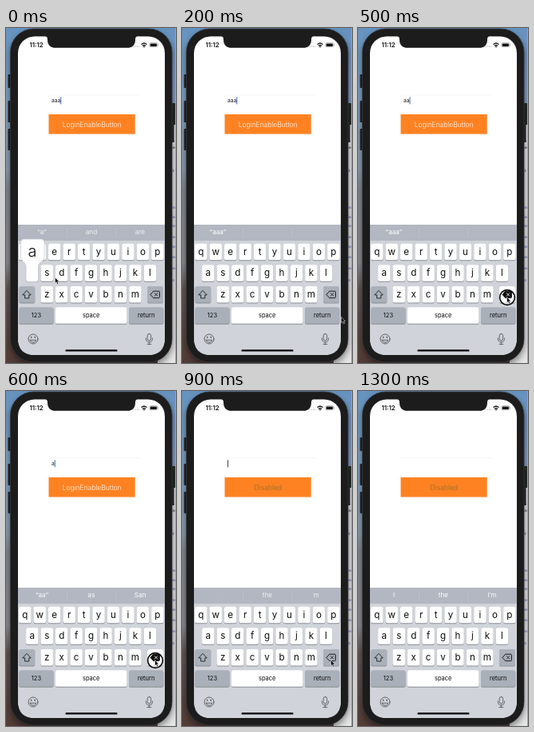
An HTML page for the animation above (1.4 s loop, 213 by 419 pixels).

```html
<!DOCTYPE html>
<html lang="en">
<head>
<meta charset="utf-8">
<title>Login form</title>
<style>
  html, body { margin: 0; width: 100%; height: 100%; overflow: hidden; background: #111; }
  svg { display: block; width: 100vw; height: 100vh; }
  text { font-family: Inter, Roboto, sans-serif; text-anchor: middle; white-space: pre; }
  .start { text-anchor: start; }
  .letter { font-size: 11.6px; fill: #0c0c0e; }
  .small { font-size: 7.5px; fill: #0c0c0e; }
  .hint { font-size: 8.2px; fill: #fff; }
  .code { font: 5px "DejaVu Sans Mono", monospace; text-anchor: start; }
</style>
</head>
<body>
<svg id="stage" viewBox="0 0 213 419" preserveAspectRatio="none" xmlns="http://www.w3.org/2000/svg">
  <defs>
    <linearGradient id="sky" x2="0" y2="1">
      <stop offset="0" stop-color="#6592bf"/>
      <stop offset=".2" stop-color="#809fbe"/>
      <stop offset=".42" stop-color="#8b9cae"/>
      <stop offset=".48" stop-color="#82868f"/>
      <stop offset=".7" stop-color="#8b8a90"/>
      <stop offset=".78" stop-color="#625552"/>
      <stop offset="1" stop-color="#533c37"/>
    </linearGradient>
    <filter id="soft" x="-10%" y="-10%" width="120%" height="120%">
      <feGaussianBlur stdDeviation="4"/>
    </filter>
  </defs>

  <!-- desktop -->
  <rect width="213" height="419" fill="url(#sky)"/>
  <rect x="190" y="120" width="23" height="299" fill="#e4e7e5"/>
  <rect x="206" y="94" width="7" height="27" fill="#1d3320"/>
  <g id="editor"></g>
  <rect x="5" y="6" width="204" height="416" rx="29" opacity=".45" filter="url(#soft)"/>
  <rect x="212" width="1" height="419" fill="#4fdc48"/>

  <!-- phone -->
  <g fill="#1d1e20">
    <rect x="2.5" y="58" width="4" height="17" rx="1"/>
    <rect x="2.5" y="91" width="4" height="27" rx="1"/>
    <rect x="2.5" y="126" width="4" height="27" rx="1"/>
    <rect x="207" y="100" width="3.5" height="43" rx="1"/>
  </g>
  <rect x="5.5" y="1" width="202.5" height="417" rx="29" fill="#1c1c1d" stroke="#363739" stroke-width=".8"/>
  <rect x="15" y="10.4" width="184" height="398.6" rx="21" fill="#fff"/>
  <path d="M47.5 9.5 Q52 10 52 14 Q52 24.8 62 24.8 H152 Q162 24.8 162 14 Q162 10 166.5 9.5Z" fill="#1c1c1d"/>

  <!-- status bar -->
  <text x="38" y="24.3" font-size="7.8" font-weight="600" fill="#111">11:12</text>
  <g fill="#888">
    <circle cx="160" cy="23" r=".6"/><circle cx="162.2" cy="23" r=".6"/>
    <circle cx="164.4" cy="23" r=".6"/><circle cx="166.6" cy="23" r=".6"/>
  </g>
  <g fill="none" stroke="#111" stroke-width="1.2">
    <path d="M169.5 20.6 Q173 17.4 176.5 20.6 M171 22.4 Q173 20.6 175 22.4"/>
    <rect x="179.8" y="18.6" width="10" height="5.2" rx="1.4" stroke="#888" stroke-width=".6"/>
  </g>
  <path d="M171.8 23.2 Q173 22.2 174.2 23.2 L173 24.6Z" fill="#111"/>
  <rect x="180.7" y="19.4" width="8.2" height="3.6" rx=".7" fill="#111"/>
  <rect x="190.3" y="20.2" width=".8" height="2" rx=".4" fill="#888"/>

  <!-- form -->
  <rect x="54" y="83.5" width="114" height=".7" fill="#f1f1f2"/>
  <text id="field" class="start" x="57" y="93.4" font-size="6.7" fill="#17191d"></text>
  <rect id="caret" y="86.3" width="1" height="9"/>
  <rect x="53.5" y="108" width="108.2" height="24.6" fill="#ff8222"/>
  <text id="button" x="107.7" y="123.6" font-size="8.6" letter-spacing="-.08"></text>

  <!-- keyboard -->
  <path d="M15 246 H199 V388 Q199 409 178 409 H36 Q15 409 15 388Z" fill="#d0d3d9"/>
  <rect x="15" y="246" width="184" height="20" fill="#b2b7c1"/>
  <g id="hints"></g>
  <g id="keys"></g>

  <g fill="none" stroke="#53565c" stroke-width=".9" stroke-linecap="round" stroke-linejoin="round">
    <path d="M26.2 328.6 L31.2 333.9 H28.8 V338 H23.6 V333.9 H21.2Z" stroke="#1c1d20"/>
    <circle cx="34" cy="389" r="6"/>
    <path d="M30.2 390.3 H37.8 Q37 393.3 34 393.3 Q31 393.3 30.2 390.3Z"/>
    <path d="M31.8 386.2 V387.4 M36.2 386.2 V387.4" stroke-width="1.3"/>
    <rect x="177.2" y="382.5" width="4.4" height="8.4" rx="2.2"/>
    <path d="M175.2 388 Q175.2 393 179.4 393 Q183.6 393 183.6 388 M179.4 393 V395.6 M177 395.6 H181.8"/>
  </g>
  <rect x="74.5" y="402.2" width="65" height="2.4" rx="1.2" fill="#08080a"/>

  <g stroke-linejoin="round">
    <rect id="eraseKey" x="177" y="323" width="20" height="20.5" rx="2.6"/>
    <circle id="ring" cx="187" cy="337" r="9.4" fill="#fff" fill-opacity=".6" stroke="#0b0b0c" stroke-width="1.6"/>
    <path id="eraseShape" d="M181 333.4 L184.7 329.2 H191.4 Q192.4 329.2 192.4 330.2 V336.6 Q192.4 337.6 191.4 337.6 H184.7Z" stroke="#0b0b0c" stroke-width=".9"/>
    <path id="eraseCross" d="M186 331.4 L190 335.4 M190 331.4 L186 335.4" fill="none" stroke-width=".9"/>
  </g>

  <g id="popup">
    <path d="M22.5 264 H44 Q48 264 48 268 V286 Q48 290 44 292.6 Q40.5 295 40.5 298 V314.5 Q40.5 317.5 37.5 317.5 H28 Q25 317.5 25 314.5 V298 Q25 295 22 292.6 Q18.5 290 18.5 286 V268 Q18.5 264 22.5 264Z" fill="#fff" stroke="#b9bcc3" stroke-width=".6"/>
    <text x="33" y="285.6" font-size="20" font-weight="300" fill="#0c0c0e">a</text>
  </g>

  <path id="mouse" d="M0 0 V7.2 L1.7 5.7 L2.9 8.5 L4.2 7.9 L3 5.2 H5.2Z" fill="#0b0b0c" stroke="#fff" stroke-width=".5"/>
</svg>
<script>
const $ = id => document.getElementById(id);
const NS = 'http://www.w3.org/2000/svg';

function add(parent, tag, attrs, text = '') {
  const node = document.createElementNS(NS, tag);
  for (const k in attrs) node.setAttribute(k, attrs[k]);
  node.textContent = text;
  return parent.appendChild(node);
}
const set = (id, attrs) => {
  for (const k in attrs) $(id).setAttribute(k, attrs[k]);
};
const show = (id, on) => set(id, { opacity: Number(on) });

// Editor text peeking out beside the phone
[['n', 143], ['ac', 151], ['it', 180], ['xe', 226], ['xe', 238],
 ['xe', 249], ['xe', 263], ['xe', 275], ['xe', 288], ['xe', 302], ['o', 317]]
  .forEach(([s, y]) => add($('editor'), 'text',
    { class: 'code', x: 208, y, fill: y < 200 ? '#30343a' : '#3f55a5' }, s));

// Keyboard
const keys = $('keys');
function key(x, y, w, label, cls, fill = '#fff') {
  add(keys, 'rect', { x, y: y + 1, width: w, height: 20.5, rx: 2.6, fill: '#898d94' });
  add(keys, 'rect', { x, y, width: w, height: 20.5, rx: 2.6, fill });
  add(keys, 'text', { class: cls, x: x + w / 2, y: y + (cls === 'letter' ? 13.9 : 12.9) }, label);
}
const GREY = '#aab0ba';
[['qwertyuiop', 23.8, 269.8], ['asdfghjkl', 32.8, 296.3], ['zxcvbnm', 51.2, 323]]
  .forEach(([row, x, y]) => [...row].forEach((c, i) => key(x + i * 18.45 - 7.7, y, 15.4, c, 'letter')));
key(16.2, 323, 20, '', 'small', GREY);
key(177, 323, 20, '', 'small', GREY);
key(16.2, 349.3, 43.4, '123', 'small', GREY);
key(62, 349.3, 89.5, 'space', 'small');
key(154, 349.3, 43.4, 'return', 'small', GREY);

// Suggestion bar
for (const x of [76, 137.5])
  add($('hints'), 'rect', { x, y: 250, width: .6, height: 12, fill: '#c0c4cc' });
const hints = [45, 107, 168].map(x => add($('hints'), 'text', { class: 'hint', x, y: 258.2 }));

// One step per 100 ms
const LISTS = {
  a: ['“a”', 'and', 'are'],
  aa: ['“aa”', 'as', 'San'],
  aaa: ['“aaa”', '', ''],
  fade: ['.', 'the', 'm'],
  empty: ['I', 'the', 'I’m']
};
// typed, suggestions, suggestion opacity, caret opacity, mouse x, mouse y, pressed
const STEPS = [
  ['aaa', 'a', .8, 1, 61.5, 312, 0],
  ['aaa', 'aaa', 1, 1, 140, 344, 0],
  ['aaa', 'aaa', 1, 1, 199.5, 361.5, 0],
  ['aaa', 'aaa', 1, .5, 192, 346, 0],
  ['aaa', 'aaa', 1, 0, 186.5, 335.5, 0],
  ['aa', 'aaa', 1, 1, 186.5, 336.5, 1],
  ['a', 'aa', 1, 1, 186.5, 336.5, 1],
  ['', 'a', 1, 1, 186.5, 336.5, 1],
  ['', 'fade', .4, 1, 186.5, 336.5, 0],
  ['', 'fade', .8, 1, 186.5, 336.5, 0],
  ['', 'empty', 1, 1, 186.5, 337.5, 0],
  ['', 'empty', 1, 1, 186.5, 337.5, 0],
  ['', 'empty', 1, .5, 186.5, 337.5, 0],
  ['', 'empty', 1, 0, null, 0, 0]
];
const STEP_MS = 100;
let last = -1;

function draw(n) {
  const [typed, list, fade, caret, x, y, pressed] = STEPS[n];
  $('field').textContent = typed;
  set('caret', { x: 57 + typed.length * 3.75, opacity: caret, fill: typed ? '#4668a8' : '#3a414d' });
  $('button').textContent = typed ? 'LoginEnableButton' : 'Disabled';
  set('button', { fill: typed ? '#fff4e8' : '#a8702e', 'font-weight': typed ? 300 : 400 });

  hints.forEach((h, i) => {
    h.textContent = LISTS[list][i];
    h.setAttribute('opacity', list === 'fade' && i === 0 ? fade * .4 : fade);
  });

  show('popup', n === 0);
  show('ring', pressed);
  set('eraseKey', { fill: pressed ? '#fff' : GREY });
  set('eraseShape', { fill: pressed ? '#0b0b0c' : 'none' });
  set('eraseCross', { stroke: pressed ? '#fff' : '#1c1d20' });
  show('mouse', x !== null);
  if (x !== null) set('mouse', { transform: `translate(${x} ${y})` });
}

function tick() {
  const n = Math.floor(performance.now() / STEP_MS) % STEPS.length;
  if (n !== last) draw(last = n);
  requestAnimationFrame(tick);
}
tick();
</script>
</body>
</html>
```
